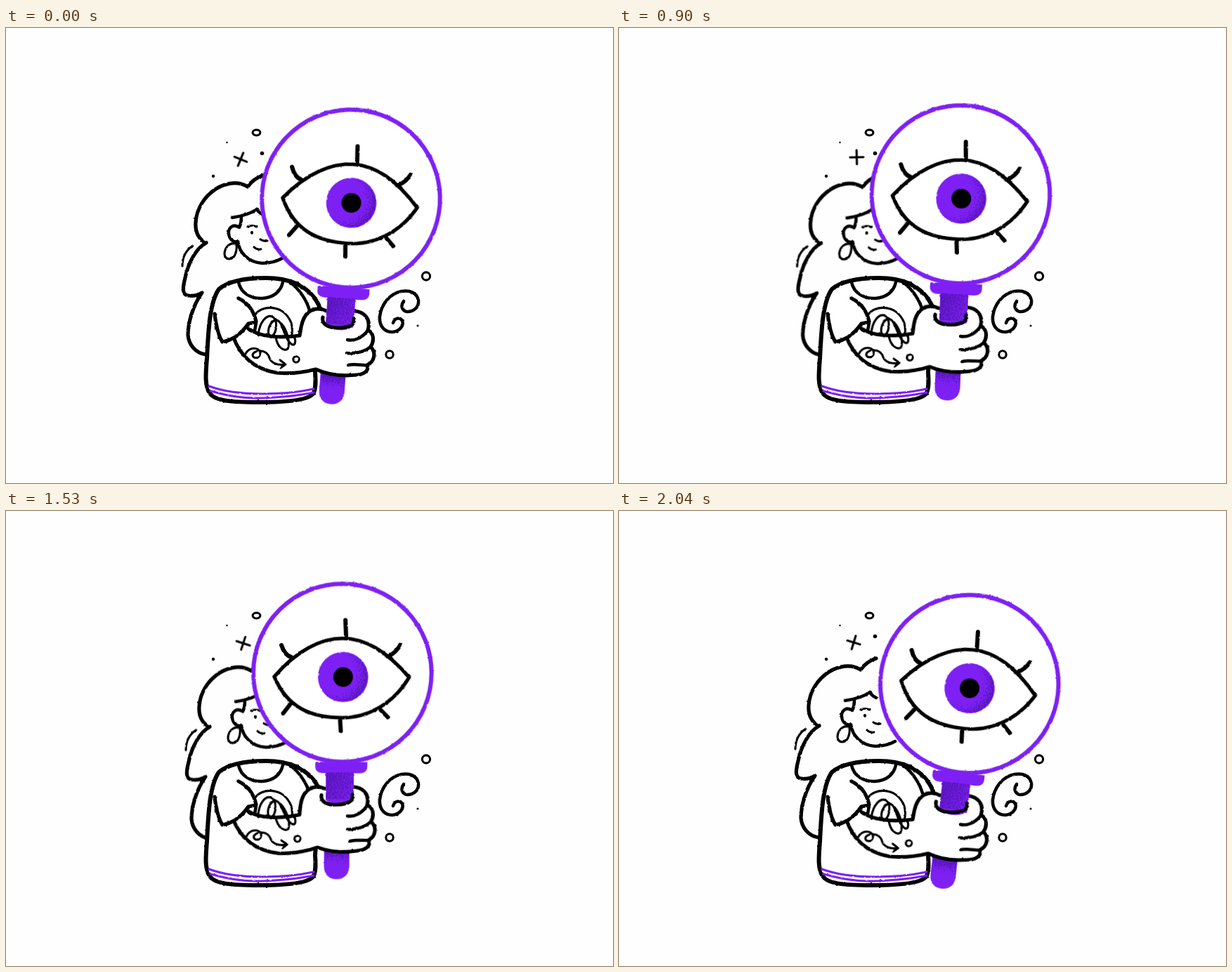
Recreate the animation shown at these times as an HTML page. Size 864x648 px, loop 2070 ms.

```html
<!DOCTYPE html>
<html lang="en">
<head>
<meta charset="utf-8">
<title>Magnifying eye</title>
<style>
  html, body { margin: 0; width: 100%; height: 100%; overflow: hidden; background: #fefefe; }
  svg { display: block; width: 864px; height: 648px; }

  .ink { fill: none; stroke: #000; stroke-width: 5.2; stroke-linecap: round; stroke-linejoin: round; }
  .bold { stroke-width: 6; }
  .mid { stroke-width: 4.5; }
  .thin { stroke-width: 3.1; }
  .paper { fill: #fff; }
  .dot { fill: #000; stroke: none; }
  .violet { fill: #7e20f4; stroke: none; }
  .violet-line { stroke: #7e20f4; }
  .rough { filter: url(#rough); }
  .grain { filter: url(#grain); }

  .lens, .arm, .head, .spark, .lid, .lash, .wink {
    animation: 2070ms linear infinite;
  }
  .lens { animation-name: lens; }
  .arm { animation-name: arm; transform-origin: 330px 440px; }
  .head { animation-name: head; }
  .spark { animation-name: spin; transform-origin: 336.5px 186px; }
  .lid { animation-name: lid; }
  .lash { animation-name: lash; }
  .wink { animation-name: wink; transform-origin: 350px 291.5px; }

  @keyframes lens {
    0%, 26.09% { transform: translate(491px, 243px) rotate(4.2deg); animation-timing-function: ease-in-out; }
    32.4% { transform: translate(489.5px, 248.5px) rotate(4.2deg); animation-timing-function: ease-in; }
    43.48% { transform: translate(486.5px, 237px) rotate(2.5deg); animation-timing-function: ease-out; }
    53.6% { transform: translate(481.5px, 231.5px) rotate(1deg); }
    62.32% { transform: translate(480px, 231px) rotate(.6deg); }
    82.61% { transform: translate(478px, 230px) rotate(0deg); animation-timing-function: ease-in-out; }
    89.9% { transform: translate(477px, 224px) rotate(-.6deg); animation-timing-function: ease-in-out; }
    98.55% { transform: translate(499px, 246.5px) rotate(6.4deg); }
    100% { transform: translate(491px, 243px) rotate(4.2deg); }
  }
  @keyframes arm {
    0%, 26.09% { transform: rotate(0deg); animation-timing-function: ease-in-out; }
    32.4% { transform: rotate(1.8deg); animation-timing-function: ease-in; }
    43.48% { transform: rotate(-1.8deg); animation-timing-function: ease-out; }
    53.6% { transform: rotate(-3.2deg); }
    62.32% { transform: rotate(-3.4deg); }
    82.61% { transform: rotate(-3.6deg); animation-timing-function: ease-in-out; }
    89.9% { transform: rotate(-4.8deg); animation-timing-function: ease-in-out; }
    98.55% { transform: rotate(.9deg); }
    100% { transform: rotate(0deg); }
  }
  @keyframes head {
    0%, 31.88% { transform: translate(0, 0); animation-timing-function: ease-in; }
    43.48% { transform: translate(2.5px, .5px); animation-timing-function: ease-out; }
    60%, 84% { transform: translate(5px, 1.5px); animation-timing-function: ease-in-out; }
    98.55%, 100% { transform: translate(0, 0); }
  }
  @keyframes spin { to { transform: rotate(360deg); } }

  @keyframes lid {
    0%, 14.5%, 28%, 100% { d: path("M-97 6 C-65 -32 -30 -49 0 -49 C32 -49 62 -32 95 6 C72 45 35 64 0 64 C-45 64 -78 50 -97 6 Z"); }
    18.84% { d: path("M-97 6 C-65 28 -30 31 0 31 C35 31 68 27 95 6 C72 45 35 65 0 65 C-45 65 -78 50 -97 6 Z"); }
    20.7%, 22.2% { d: path("M-97 6 C-78 50 -45 64 0 64 C35 64 72 45 95 6 C72 45 35 65 0 65 C-45 65 -78 50 -97 6 Z"); }
  }
  @keyframes lash {
    0%, 14.5%, 28%, 100% { d: path("M4 -75 L5 -52 M-87 -39 C-84 -30 -80 -24 -73 -22 M82 -40 C78 -32 73 -28 66 -24"); }
    18.84% { d: path("M2 54 L0 33 M-75 41 C-70 37 -65 31 -59 25 M56 44 C54 39 51 33 49 28"); }
    20.7%, 22.2% { d: path("M-2 84 L-3 66 M-84 60 C-80 56 -75 52 -70 48 M65 63 C62 59 57 54 53 51"); }
  }
  @keyframes wink {
    0%, 15.5%, 27%, 100% { transform: scale(1, 1); }
    18.8%, 22.2% { transform: scale(2.2, .5); }
  }
</style>
</head>
<body>
<svg viewBox="0 0 864 648" role="img" aria-label="A woman holding a magnifying glass with a large eye">
  <defs>
    <filter id="rough" color-interpolation-filters="sRGB" x="-15%" y="-15%" width="130%" height="130%">
      <feTurbulence type="fractalNoise" baseFrequency=".16" numOctaves="2" seed="4"/>
      <feDisplacementMap in="SourceGraphic" scale="2.2" xChannelSelector="R" yChannelSelector="G"/>
    </filter>
    <filter id="grain" color-interpolation-filters="sRGB" x="0" y="0" width="100%" height="100%">
      <feTurbulence type="fractalNoise" baseFrequency=".6" numOctaves="2" seed="9"/>
      <feComposite in2="SourceGraphic" operator="arithmetic" k2="1" k3="1" k4="-1"/>
      <feColorMatrix values="0 0 0 0 .34  0 0 0 0 .08  0 0 0 0 .73  0 0 0 4 0"/>
    </filter>
    <radialGradient id="irisShade" cx=".33" cy=".42" r=".72">
      <stop offset=".42" stop-opacity=".2"/>
      <stop offset=".95" stop-opacity=".8"/>
    </radialGradient>
    <linearGradient id="gripShade" x1="0" y1="0" x2="1" y2=".5">
      <stop offset="0" stop-opacity=".8"/>
      <stop offset="1" stop-opacity=".58"/>
    </linearGradient>
    <linearGradient id="endShade" x1="0" y1="0" x2="0" y2="1">
      <stop offset=".4" stop-opacity=".85"/>
      <stop offset="1" stop-opacity=".3"/>
    </linearGradient>
    <clipPath id="eyeClip">
      <path class="lid" d="M-97 6 C-65 -32 -30 -49 0 -49 C32 -49 62 -32 95 6 C72 45 35 64 0 64 C-45 64 -78 50 -97 6 Z"/>
    </clipPath>
  </defs>

  <!-- floating marks -->
  <g class="ink thin">
    <ellipse cx="356.5" cy="149" rx="5.4" ry="4"/>
    <circle cx="598" cy="353.5" r="5.6"/>
    <circle cx="546" cy="465" r="5.2"/>
    <g class="dot">
      <circle cx="314.5" cy="163" r="1.2"/>
      <circle cx="364.5" cy="178.5" r="2.8"/>
      <circle cx="295" cy="211" r="2.2"/>
      <circle cx="586" cy="424" r="1.5"/>
    </g>
  </g>
  <path class="ink mid rough" d="M566 389 C561 396 564 403 571 404 C581 404 588 397 587 388 C585 377 575 373 563 375 C546 378 534 394 532 411 C531 425 539 433 550 433 C560 432 567 424 564 417 C561 411 553 413 551 420"/>
  <g class="spark">
    <path class="ink thin" transform="translate(334 187) rotate(22)" d="M-9.5 0 H9.5 M0 -10 V10"/>
  </g>

  <!-- hair and face -->
  <g class="head">
    <g class="ink rough">
      <path d="M366 210 C356 213 349 219 344 226 C330 217 312 221 299 229 C282 240 271 258 270 277 C269 291 275 302 285 306 C271 313 259 335 255 356 C251 371 251 380 259 381 C267 382 273 381 279 377 C266 395 259 420 259 437 C260 451 270 463 284 465"/>
      <path class="thin" d="M266 310 C257 316 251 326 251 339"/>
      <path class="mid" d="M322 270 C336 268 349 264 357 258 C359 262 362 264 366 266 M335 270 C335 275 334 280 332 284 C323 278 316 285 317 293 C318 301 324 306 330 304 C332 320 345 334 365 335 C378 335 386 332 393 328"/>
      <path class="thin" d="M325 307 C317 306 311 314 311 322 C312 331 322 331 326 323 C329 316 329 308 326 305"/>
      <path class="thin" d="M344 283 C348 281 352 281 357 283 M353 312 C356 315 359 316 363 315 M362 301 C365 303 368 304 372 303"/>
    </g>
    <ellipse class="dot wink" cx="350" cy="291.5" rx="2.1" ry="2.4"/>
  </g>

  <!-- shirt -->
  <g class="ink rough">
    <path class="bold paper" d="M303 372 C318 359 345 356 370 356 C390 356 404 360 413 364 C429 371 442 385 447 399 L440 490 C441 505 441 515 437 521 C430 530 400 533 360 533 C320 533 297 531 290 520 C283 510 284 495 286 470 C288 430 290 390 303 372 Z"/>
    <path class="mid" d="M331 362 C334 378 350 386 365 385 C380 384 391 376 394 362 M404 362 C418 372 428 388 432 402"/>
    <path class="thin violet-line" d="M289 510 C310 518 340 521 365 521 S415 519 438 514 M291 517 C315 524 340 528 365 527 S415 524 438 519"/>
    <path class="thin" d="M355 408 C363 395 395 392 406 420 C408 428 408 434 406 440"/>
  </g>

  <!-- handle end behind the fist -->
  <g class="lens">
    <g class="rough">
      <path class="violet" d="M-25 235 H11 V276 C11 288 2 294 -7 294 C-17 294 -25 288 -25 276 Z"/>
    </g>
    <path class="grain" fill="url(#endShade)" d="M-24 235 H10 V276 H-24 Z"/>
  </g>

  <!-- forearm and fist -->
  <g class="arm">
    <g class="ink rough">
      <path class="paper" d="M323 438 C332 465 350 485 385 491 C405 493 422 491 441 486 C460 495 480 496 500 494 C510 493 517 488 514 480 C525 475 527 462 519 454 C525 445 523 434 515 430 C520 415 510 404 496 403 L456 403 C448 399 440 399 433 403 C422 410 420 425 418 438 C390 442 360 440 345 428" />
      <path class="mid" d="M486 444 C495 446 506 442 514 432 M485 463 C500 464 512 460 519 454 M487 480 C498 478 508 481 514 480"/>
      <path class="thin" d="M359 437 C361 418 371 408 379 411 C388 416 385 436 378 439 C371 439 372 424 381 417 C393 411 394 436 403 447 C413 459 413 441 410 441 M384 440 C386 455 396 461 401 457 C405 448 400 430 392 421"/>
      <path class="thin" d="M341 464 C347 453 360 455 362 462 C362 471 352 472 351 466 C352 458 371 456 375 470 C378 478 388 481 398 479 M390 473 L398 479 L391 484"/>
      <circle class="thin" cx="413" cy="472" r="4.2"/>
    </g>
  </g>

  <!-- sleeve -->
  <g class="ink rough">
    <path class="paper" stroke="none" d="M303 385 L331 385 C345 392 353 404 356 418 L346 425 C333 438 320 446 308 447 C302 437 299 425 297 407 Z"/>
    <path d="M331 385 C345 392 353 404 356 418 M297 407 C299 425 303 439 308 447 C321 445 333 438 345 421 L355 419"/>
    <path class="mid" d="M345 421 C342 429 348 433 354 431 L356 420"/>
  </g>

  <!-- magnifying glass -->
  <g class="lens">
    <g class="rough">
      <path class="violet" d="M-23 138 H17 L17 181 C10 190 -16 190 -23 181 Z"/>
      <path class="violet" d="M-38 127 H36 V134 C36 140 31 143 25 143 H-27 C-33 143 -38 140 -38 134 Z"/>
    </g>
    <path class="grain" fill="url(#gripShade)" d="M-22 142 H16 V180 H-22 Z"/>
    <circle class="ink bold paper violet-line rough" r="126.8"/>
    <g clip-path="url(#eyeClip)">
      <circle class="violet rough" cx="1" cy="6" r="35.8"/>
      <circle class="grain" cx="1" cy="6" r="35" fill="url(#irisShade)"/>
      <circle class="dot" cx="1" cy="6" r="14"/>
    </g>
    <g class="ink rough">
      <path class="lid" d="M-97 6 C-65 -32 -30 -49 0 -49 C32 -49 62 -32 95 6 C72 45 35 64 0 64 C-45 64 -78 50 -97 6 Z"/>
      <path class="lash bold" d="M4 -75 L5 -52 M-87 -39 C-84 -30 -80 -24 -73 -22 M82 -40 C78 -32 73 -28 66 -24"/>
      <path class="bold" d="M-74 45 L-84 58 M-3 67 L-2 83 M53 51 L65 63"/>
    </g>
  </g>

  <!-- rim of the grip -->
  <g class="arm">
    <path class="ink rough" d="M451 412 C449 421 457 427 473 427 C488 427 497 423 495 414"/>
  </g>
</svg>
</body>
</html>
```
